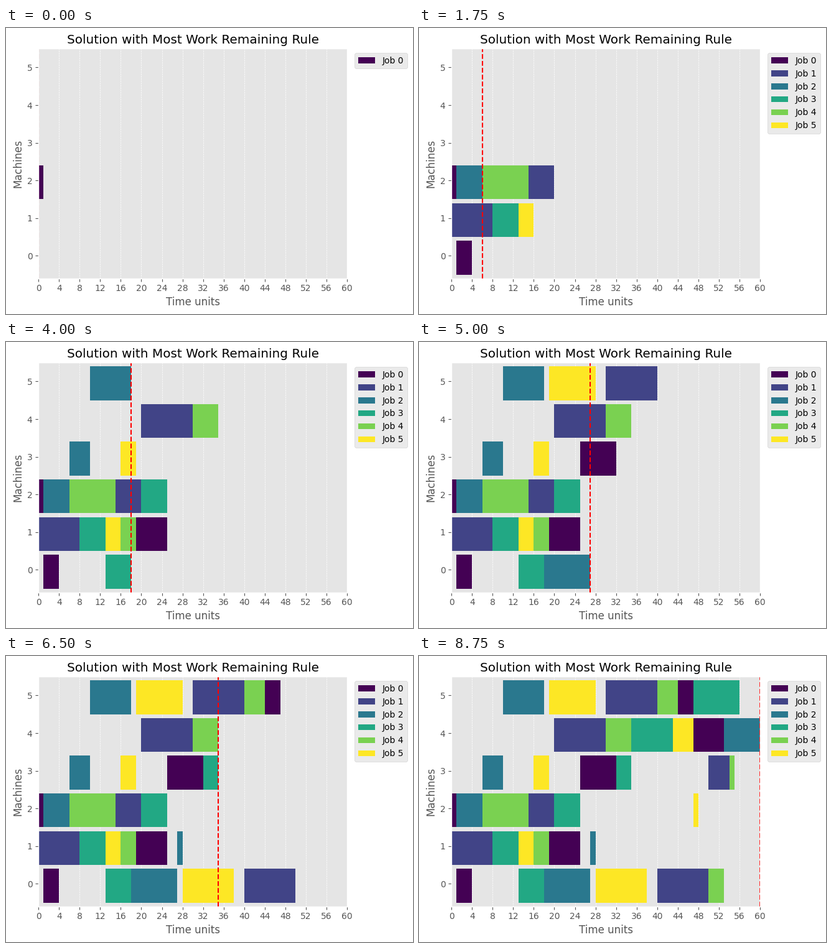
A matplotlib script for the animation above (9000 ms loop, 654 px wide and 460 px high).

```python
import matplotlib.pyplot as plt
from matplotlib.animation import FuncAnimation
from matplotlib.patches import Patch

W, H, DPI, PAD = 654, 460, 100, 10
AX_W, AX_H = 496, 369.6

# (machine, duration) steps of each job
JOBS = [
    [(2, 1), (0, 3), (1, 6), (3, 7), (5, 3), (4, 6)],
    [(1, 8), (2, 5), (4, 10), (5, 10), (0, 10), (3, 4)],
    [(2, 5), (3, 4), (5, 8), (0, 9), (1, 1), (4, 7)],
    [(1, 5), (0, 5), (2, 5), (3, 3), (4, 8), (5, 9)],
    [(2, 9), (1, 3), (4, 5), (5, 4), (0, 3), (3, 1)],
    [(1, 3), (3, 3), (5, 9), (0, 10), (4, 4), (2, 1)],
]
N = len(JOBS)
COLORS = [plt.get_cmap("viridis")(j / (N - 1)) for j in range(N)]


def dispatch():
    """Schedule the jobs in turn; return the bars and the clock after each."""
    job_free, machine_free, done = [0] * N, [0] * N, [0] * N

    def start(j):
        return max(job_free[j], machine_free[JOBS[j][done[j]][0]])

    bars, clock = [], []
    for i in range(N * N):
        j = i % N
        machine, length = JOBS[j][done[j]]
        begin = start(j)
        bars.append((j, machine, begin, length))
        job_free[j] = machine_free[machine] = begin + length
        done[j] += 1
        waiting = [start(k) for k in range(N) if done[k] < N]
        clock.append(min(waiting, default=max(job_free)))
    return bars, clock


bars, clock = dispatch()
makespan = clock[-1]

plt.style.use("ggplot")
# The tiny excess keeps the pixel size from being rounded down
fig = plt.figure(figsize=((W + 1e-3) / DPI, (H + 1e-3) / DPI), dpi=DPI)


def place(x, y):
    return [x / W, y / H, AX_W / W, AX_H / H]


left, bottom = 80, 52.8
ax = fig.add_axes(place(left, bottom))
ax.set_title("Solution with Most Work Remaining Rule")
ax.set_xlabel("Time units")
ax.set_ylabel("Machines")
ax.grid(True, axis="x", linestyle="--", linewidth=0.5)
ax.yaxis.grid(False)

blocks = [ax.broken_barh([(begin, length)], (1 + 10 * machine, 9),
                         facecolors=COLORS[j])
          for j, machine, begin, length in bars]
now = ax.axvline(0, color="red", linestyle="--")
handles = [Patch(facecolor=c, label=f"Job {j}") for j, c in enumerate(COLORS)]

ax.set_xlim(0, makespan)
ax.set_ylim(0, 1 + 10 * N)
ax.set_xticks(range(0, makespan + 1, 4))
ax.set_yticks([6 + 10 * m for m in range(N)], [str(m) for m in range(N)])


def update(i):
    for k, block in enumerate(blocks):
        block.set_visible(k <= i)
    now.set_xdata([clock[i]] * 2)
    ax.legend(handles=handles[:i + 1], loc="upper left",
              bbox_to_anchor=(1.01, 1))


# Shift the axes so labels keep an even margin at the lower left
update(0)
tight = fig.get_tightbbox()
ax.set_position(place(left + PAD - tight.x0 * DPI,
                      bottom + PAD - tight.y0 * DPI))

anim = FuncAnimation(fig, update, frames=len(bars), interval=250,
                     init_func=lambda: update(0), repeat=True, repeat_delay=0)
plt.show()
```
